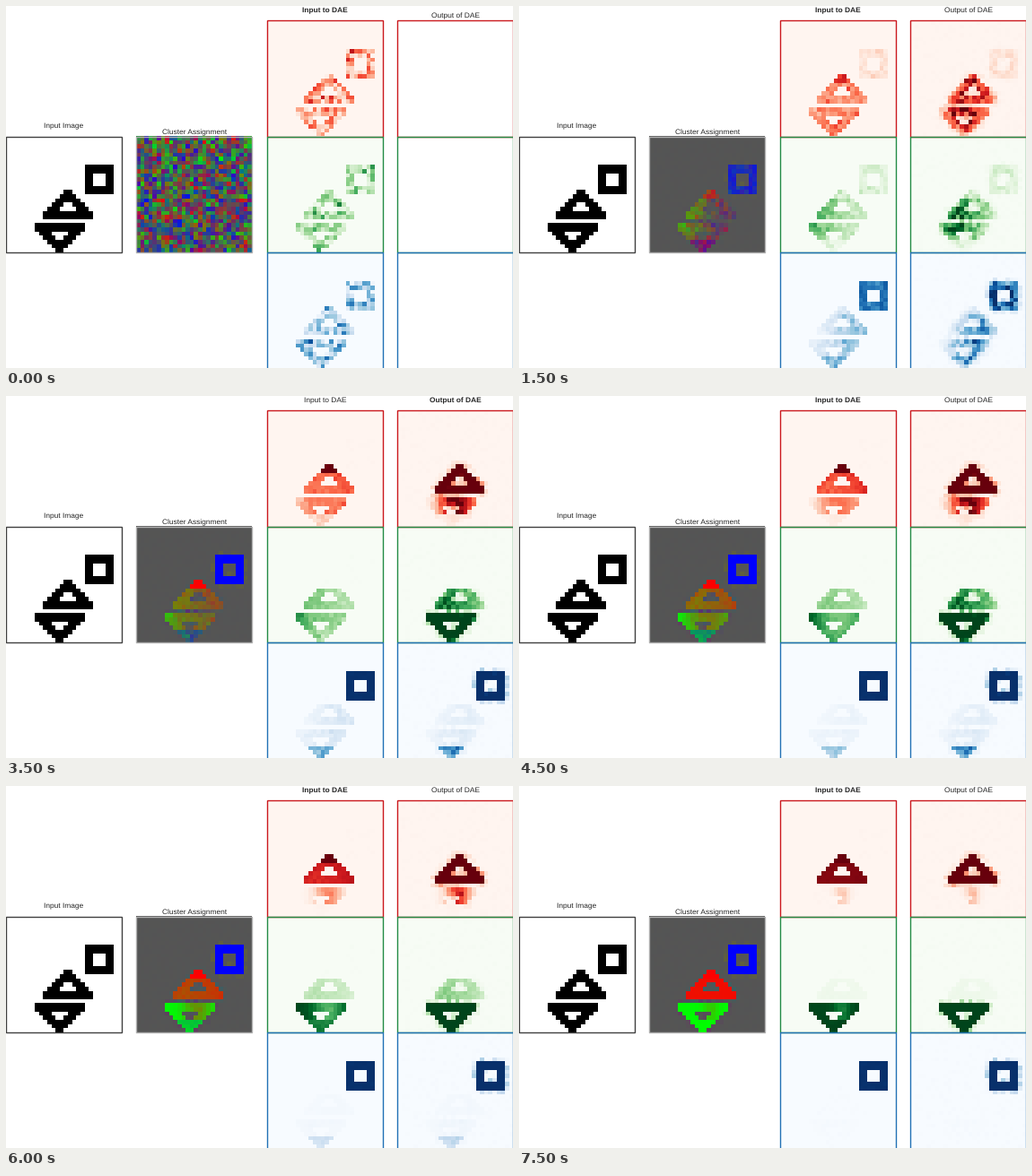
A matplotlib script for the animation above (8 s loop, 565 px wide and 404 px high).

```python
import numpy as np
import matplotlib.pyplot as plt
from matplotlib.animation import FuncAnimation
from matplotlib.patches import Rectangle

W, H, DPI = 565, 404, 100
N, PW, PH = 28, 129, 129.4
COLS = 0.1 + 145.35 * np.arange(4)
ROWS = 16.3 + PH * np.arange(3)
FRAMES, STEP_MS = 16, 500
plt.rcParams["font.family"] = "Liberation Sans"
plt.rcParams["text.hinting"] = "none"

rng = np.random.default_rng(7)
yy, xx = np.mgrid[:N, :N]
RED, GREEN, BLUE = range(3)


def square(x0, y0):
    ring = np.zeros((N, N))
    ring[y0:y0 + 7, x0:x0 + 7] = 1
    ring[y0 + 2:y0 + 5, x0 + 2:x0 + 5] = 0
    return ring


def triangle(x0, y0, flip=False):
    tri = np.zeros((7, 12))
    for r in range(7):
        half = min(r + 1, 6)
        tri[r, 6 - half:6 + half] = 1
    tri[3, 5:7] = 0
    tri[4, 4:8] = 0
    full = np.zeros((N, N))
    full[y0:y0 + 7, x0:x0 + 12] = tri[::-1] if flip else tri
    return full


def blur(a, times=1):
    for _ in range(times):
        p = np.pad(a, 1)
        a = sum(p[i:i + N, j:j + N] for i in range(3) for j in range(3)) / 9
    return a


BOX, UP, DOWN = square(19, 7), triangle(9, 13), triangle(7, 21, True)
IMAGE = BOX + UP + DOWN
DENSITY = blur(IMAGE, 4)
DENSITY /= DENSITY.max()

# Part, winning cluster, its rival, first share, steps until it has won
PARTS = [
    (BOX, BLUE, GREEN, 1 / 3, 1.7),
    (UP * (yy < 15), RED, GREEN, 1 / 3, 2),
    (UP * (yy >= 15), RED, GREEN, 1 / 3, 5.5),
    (DOWN * (yy < 25), GREEN, RED, 1 / 3, 6),
    (DOWN * (yy >= 25), GREEN, BLUE, 0, 5),
]
TILT = [.1, -.5, .8]

grain = rng.uniform(-1, 1, (3, N, N))
spill = rng.random((3, N, N)) ** 2
dust = rng.random((3, N, N)) ** 4


def smooth(t):
    t = min(t, 1)
    return t * t * (3 - 2 * t)


def reconstruct(step):
    field = np.zeros((3, N, N))
    for part, winner, rival, first, steps in PARTS:
        won = first + (1 - first) * smooth((step + 1) / steps)
        leak = .4 * .5 ** step
        field[winner] += part * won
        field[rival] += part * (1 - won) * (1 - leak)
        field[3 - winner - rival] += part * (1 - won) * leak

    jitter = .5 * .7 ** step
    slope = np.where(yy < 21, xx - 14.5, xx - 12.5) / 6 * (BOX == 0)
    near = 1.3 * np.exp(-((xx - 14.5) / (14 * .6 ** step)) ** 2)
    field[RED] *= np.where(DOWN > 0, near, 1)
    gain = .2 + 1.7 * DENSITY ** 2 + .5 * step

    out = np.zeros((3, N, N))
    for k in range(3):
        f = field[k] * gain * (1 + 2 * jitter * TILT[k] * slope)
        f = np.clip(f, 0, 1.25)
        halo = blur(f) * (1 - IMAGE) * spill[k] * .9
        out[k] = f * (1 + jitter * grain[k]) + halo + .01 * dust[k]
    return np.clip(out, 0, 1)


def assign(out):
    like = np.where(IMAGE > 0, out, 1 - out) + 1e-3
    return like / like.sum(axis=0)


outputs = [reconstruct(s) for s in range(5)]
start = rng.dirichlet([1.8] * 3, (N, N)).transpose(2, 0, 1)
clusters = [start] + [assign(o) for o in outputs]

fig = plt.figure(figsize=(W / DPI, H / DPI), dpi=DPI, facecolor="white")
ax = fig.add_axes([0, 0, 1, 1])
ax.axis("off")


def panel(x, y, data, edge, cmap=None):
    im = ax.imshow(data, cmap=cmap, vmin=0, vmax=1, interpolation="nearest",
                   extent=(x, x + PW, y + PH, y), aspect="auto")
    ax.add_patch(Rectangle((x, y), PW, PH, fill=False, ec=edge, lw=1,
                           zorder=3))
    return im


def title(col, y, text):
    return ax.text(COLS[col] + PW / 2, y, text, fontsize=6, color="#262626",
                   ha="center", va="baseline")


panel(COLS[0], ROWS[1], IMAGE, "#404040", "gray_r")
cluster_im = panel(COLS[1], ROWS[1], np.zeros((N, N, 3)), "#b0b0b0")
PALETTE = [("Reds", "#cb181d"), ("Greens", "#238b45"), ("Blues", "#2171b5")]
blank = np.zeros((N, N))
in_ims, out_ims = [
    [panel(COLS[c], y, blank, edge, cmap)
     for y, (cmap, edge) in zip(ROWS, PALETTE)] for c in (2, 3)]
ax.set_xlim(0, W)
ax.set_ylim(H, 0)

title(0, 136.3, "Input Image")
cluster_title = title(1, 143.3, "Cluster Assignment")
in_title = title(2, 7.2, "Input to DAE")
out_title = title(3, 7.2, "Output of DAE")
CYCLE = [in_title, out_title, cluster_title]


def draw(i):
    # Each cycle updates the input, then the output, then the clusters
    inputs = clusters[i // 3] * IMAGE
    n_out = (i + 2) // 3
    cluster_im.set_data(clusters[(i + 1) // 3].transpose(1, 2, 0))
    for k in range(3):
        in_ims[k].set_data(inputs[k])
        out_ims[k].set_visible(n_out > 0)
        if n_out:
            out_ims[k].set_data(outputs[n_out - 1][k])
    for j, label in enumerate(CYCLE):
        label.set_fontweight("bold" if i % 3 == j else "normal")
    out_title.set_y(7.2 if n_out else 13.2)
    return []


anim = FuncAnimation(fig, draw, frames=FRAMES, interval=STEP_MS, repeat=True,
                     repeat_delay=0, blit=False)
plt.show()
```
